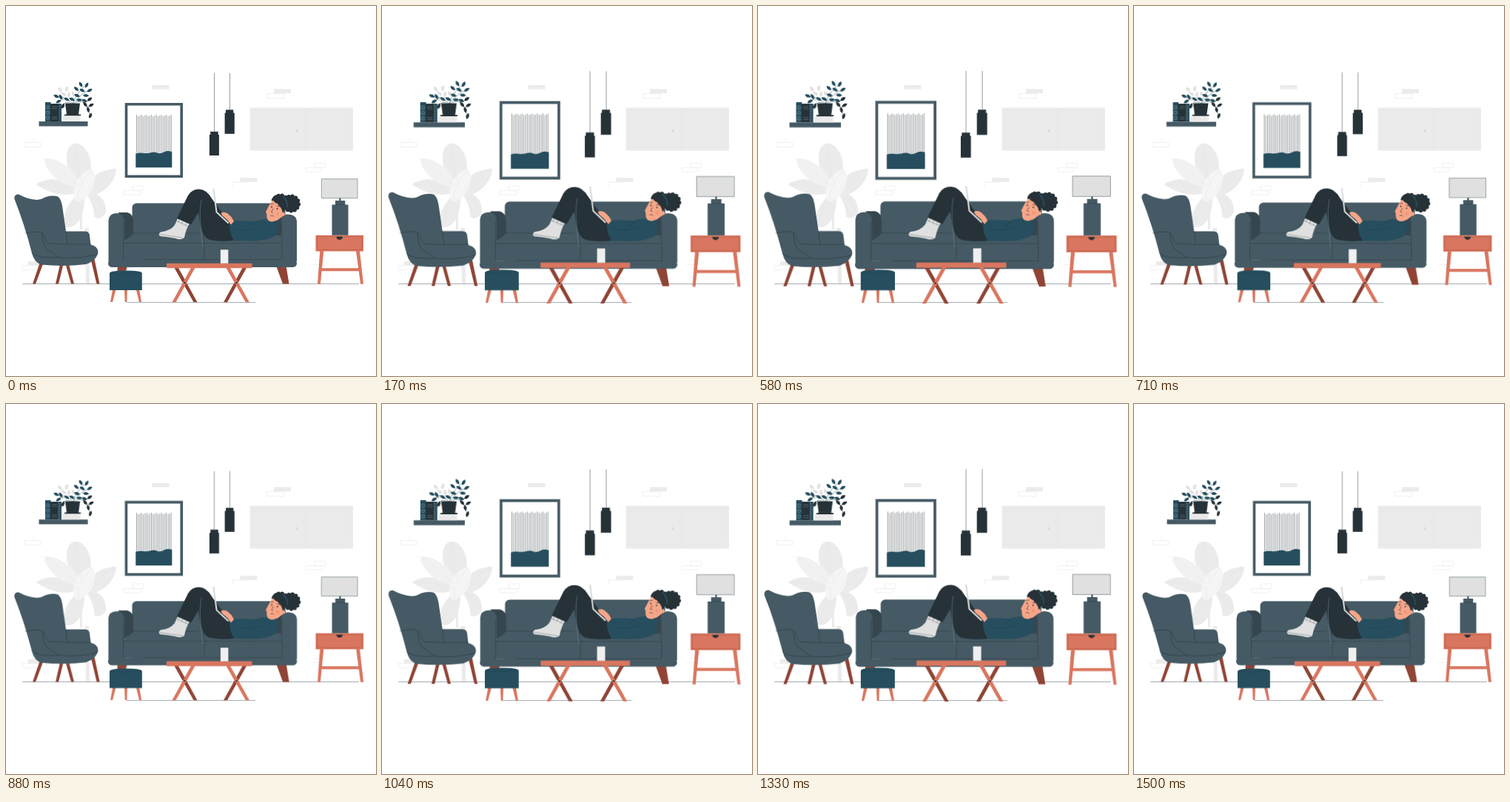
An HTML page for the animation above (1540 ms loop, 500 by 500 pixels).

```html
<!DOCTYPE html>
<html lang="en">
<head>
<meta charset="utf-8">
<title>Living room</title>
<style>
  html, body { margin: 0; width: 100%; height: 100%; overflow: hidden; background: #fff; }
  svg { display: block; width: 100vw; height: 100vh; }
  .beat { animation: beat 1540ms infinite cubic-bezier(.37, 0, .63, 1); }
  @keyframes beat {
    0%, 97.4%, 100% { transform: scale(1); }
    22.4% { transform: scale(1.097); }
    55.4% { transform: scale(1); }
    78.2% { transform: scale(1.081); }
  }
  #shelf { transform-origin: 81px 132.5px; }
  #frame { transform-origin: 200px 181.5px; }
  #pendants { transform-origin: 292px 146px; }
  #lamp { transform-origin: 451px 304px; }
  #sofa { transform-origin: 266px 311px; }
  #chair { transform-origin: 68.5px 314px; }
  #stool { transform-origin: 162px 379px; }
  #table { transform-origin: 274.5px 365px; }
  .slate { fill: #455a64; } .dark { fill: #263238; } .teal { fill: #264e5e; }
  .clay { fill: #d9765f; } .rust { fill: #8f4435; } .skin { fill: #f6a688; }
  .pale { fill: #e0e0e0; } .wall { fill: #ebebeb; }
  .line { fill: none; stroke: #263238; stroke-width: .6; stroke-linecap: round; stroke-linejoin: round; }
  .thin { fill: none; stroke: #ebebeb; stroke-width: .7; }
  .vein { fill: none; stroke: #e0e0e0; stroke-width: .5; }
</style>
</head>
<body>
<svg viewBox="0 0 500 500">
  <g id="bricks">
    <path class="wall" d="M197.500 107h23v5.500h-23zM362 112.300h23v5.700h-23zM316.500 232.300h23v5.500h-23zM30 345h18v5.500h-18z"/>
    <path class="thin" d="M352.500 118.500h23.500v6h-23.500zM306 238h22M306 238v6M171.500 243h13.500v6.500h-13.500zM158.500 249.500h24v5.500h-24zM25 184.500h22v6h-22zM37 184v-5M416.500 212.500h15v6h-15zM405.500 218.500h21v5.500h-21zM22 350.500h22v6h-22zM411 349.500h13v-6h-7"/>
  </g>

  <g id="cabinet">
    <path class="wall" d="M329.500 137.500H469v58H329.500z"/>
    <path class="vein" d="M335 141.500h67v49h-67zM406.500 141.500H464v49h-57.500zM404 138v57"/>
    <circle cx="393" cy="168.500" r="2" fill="#dcdcdc"/>
  </g>

  <g id="monstera">
    <path class="wall" d="M98 262Q100 285 100 302h3Q102 280 105 262zM106.500 300h5.500l1 75.500h-5z"/>
    <path class="wall" d="M100 247C79 226 75 187 95 185.500C114 188 121 222 109 244zM97 250C82 262 52 250 41 241C52 231 80 232 97 245zM109 250C113 230 128 221 149 219.500C149 236 133 255 111 257zM99 255C84 262 75 285 79 298C93 303 106 288 106 259z"/>
    <path fill="#f1f1f1" d="M97 247C78 243 51 225 52 206C72 205 92 220 99 240z"/>
    <path class="wall" d="M109 253C123 250 137 262 135 279C130 288 121 289 119 284C120 270 112 262 109 253z"/>
    <path fill="#f5f5f5" d="M95 265C85 250 97 224 116 220C127 231 116 260 97 265z"/>
    <path class="vein" opacity=".7" d="M94 190Q97 220 104 243M55 209Q76 222 97 243M45 241Q72 242 96 247M145 222Q122 232 110 251M82 295Q88 272 100 259M116 222Q99 238 96 263M133 278Q124 260 111 254"/>
  </g>

  <path d="M22 375.500H477M163 400.600H337" stroke="#455a64" stroke-width=".5"/>

  <g id="shelf" class="beat">
    <path class="slate" d="M44.500 156H110.500v6.500h-66z"/>
    <path class="teal" d="M53 130h7.500v26H53zM71 132h4v24h-4z"/>
    <path class="dark" d="M60 132h11v24H60z"/>
    <path d="M62 136h7M62 138.500h7M62 150h7M62 152.500h7" stroke="#78909c" stroke-width=".5"/>
    <g fill="none" stroke="#90a4ae" stroke-width=".6">
      <circle cx="56.500" cy="137" r="2"/><circle cx="56.500" cy="144" r="2"/><circle cx="56.500" cy="151" r="2"/>
      <path d="M73 134v20" stroke-dasharray="1.500 2"/>
    </g>
    <path class="wall" d="M76.500 148.500h24v7.500h-24z"/>
    <path class="vein" d="M77 152h23M82 149v7M95 149v7"/>
    <g id="leaves"></g>
    <path class="dark" d="M80 131.500h20l-2 15.500h-16zM79 146.500h22v1.700H79z"/>
  </g>

  <g id="frame" class="beat">
    <path d="M162.500 132.700h74.700v97.500h-74.700z" fill="#fff" stroke="#455a64" stroke-width="3.600"/>
    <path id="rain" fill="none" stroke="#263238" stroke-width=".45"/>
    <path class="teal" d="M175.300 199.500q5-1.500 10-.7t10-.6 9 .3 9-1.100 11-.3v21.200h-49z"/>
  </g>

  <g id="pendants" class="beat">
    <path class="line" stroke-width=".5" d="M281.500 91v79M302.500 91v50" opacity=".8"/>
    <path class="dark" d="M276.200 169.700h10.500v4.300h1.200v28h-13v-28h1.300zM297 140.300h10.300v4.200h1.500v28.300h-13.200v-28.300h1.400z"/>
  </g>

  <g id="lamp" class="beat">
    <path class="clay" d="M424.300 331h5l-4.400 44.800h-3.900zM473 331h5l5 44.800h-3.900zM426 354.300h51v4h-51zM418.500 309.700h64.500v21.700h-64.500z"/>
    <path fill="none" stroke="#a9543f" stroke-width=".5" d="M420.500 311.700h60.500v17.700h-60.500z"/>
    <path class="dark" d="M446.500 311.700a4.200 4 0 0 0 8.400 0zM450.500 259h1.800v5h-1.800z"/>
    <path class="slate" d="M445 263h13.300v5.500h4.200v41.200h-22v-41.200h4.500z"/>
    <path class="line" d="M445.500 268.500h12.500" opacity=".6"/>
    <path class="pale" d="M426.300 233.700H475v26h-48.700z" stroke="#455a64" stroke-width=".5"/>
  </g>

  <g id="sofa" class="beat">
    <path class="rust" d="M151 351h13l-6.500 24.500h-8.500zM365 351H378.500l4 24.500H374z"/>
    <rect class="slate" x="170.500" y="266.400" width="207" height="80" rx="6"/>
    <path class="line" d="M266.500 268V306" opacity=".3"/>
    <path fill="#36464e" d="M152 279H164Q172 281 172 291V308L158 320z"/>
    <path class="slate" d="M138.500 345V290Q139 280.500 149 280Q160 280.500 160 292V345z"/>
    <path fill="#36464e" d="M360 292Q361 281 372 280V310H360z"/>
    <path class="slate" d="M372 345V292Q372 282.500 380 281.500Q393 281.500 393 292V345z"/>
    <path class="slate" d="M158 320.500L172 307H362L373 320.500V343H158z"/>
    <rect class="slate" x="138" y="342.700" width="255" height="10.300" rx="5"/>
    <path class="line" d="M159 320.500L172 307H260M158.500 320.500H373V342M158.500 292V342M266.500 307L268 320.500V342M186 342.700H373M372.500 292V320" opacity=".65"/>

    <g id="person">
      <path class="pale" d="M232 287L248 294Q243 302 241 313Q236 317 229 314Q218 312 208 311Q205 308 209 305.500Q222 304 228 296z"/>
      <path d="M231 291L246 297.500M208 308.500Q222 311 238 313M234 288l-1 4M239 290l-1 4M244 293l-1 3" class="line" opacity=".5"/>
      <path class="dark" d="M231 287L246 256Q251 247.500 261 247.500Q271 248 278 260L303 295L308 317Q287 319 274 315.500Q266 312 262.500 296L260 279L250 295.500z"/>
      <path d="M264 262Q261 275 263 296Q265 320 266 325" fill="none" stroke="#78909c" stroke-width=".5"/>
      <path class="teal" d="M302 296Q305 291 309 290.500Q322 290 338 291Q349 286 365 289.500Q371 301 363 311Q352 317 332 317.500L308 317Q302 307 302 296z"/>
      <path class="line" d="M310 301Q324 306 344 300M340 291Q334 294 330 300" opacity=".5"/>
      <path class="skin" d="M290.500 280Q293 277.500 299 280L304.500 285L308 291L304 295.500L299.500 289.500Q295 285.500 292.500 283.500zM353 284L366 290L374 284L372 276z"/>
      <path d="M280.500 247.500L284.500 278.500L300 293" fill="none" stroke="#d8dadb" stroke-width="2" stroke-linejoin="round" stroke-linecap="round"/>
      <g class="dark">
        <circle cx="385" cy="267" r="11"/>
        <circle cx="371" cy="265" r="10"/>
        <path id="curls" fill="none" stroke="#263238" stroke-linecap="round" stroke-width="5.500"/>
      </g>
      <path class="skin" d="M360.500 262Q355.500 268 353 274.500L351 278L352.300 281Q351.800 286 354 289.500Q358 293 365 290Q373 286 376 278Q372 272 369 266Q365 261 360.500 262z"/>
      <path class="dark" d="M358.500 263Q361 254 369 255L377 263Q380 274 374 280Q373 274 370 271Q368 270 367 267Q363 266 362 263.500Q360 262.500 358.500 263z"/>
      <path d="M374 257Q381 263 380 272" fill="none" stroke="#264e5e" stroke-width="2"/>
      <circle class="skin" cx="374.500" cy="281.500" r="2.400"/>
      <circle class="dark" cx="359" cy="271.500" r=".9"/><circle class="dark" cx="366.500" cy="274" r=".9"/>
      <path class="line" d="M358 268l3-.6M366 270l3 1.500M361 274l-2.500 4.500 2 .8M357.500 283.500q2-1.500 4 .5"/>
      <circle cx="367" cy="281" r="2.200" fill="#e7795f" opacity=".35"/>
    </g>
  </g>

  <g id="chair" class="beat">
    <path class="rust" d="M46 346h5l-11 29.500h-4zM73.500 347h4.500l-7 28.500h-4zM80 347h4.500l7.500 28.500h-4zM114.500 342h5l7 33.500h-4z"/>
    <path class="slate" d="M11.500 261Q10.500 254.500 17 254.500Q30 261.500 42 262Q48 261.500 54 258Q63 255.300 70 257.500Q74 260 76 270L81 304.500H106.500Q112.500 304.500 113 310L114.500 322.500Q124.500 325 124.500 332.500Q122.500 344 108 349Q79 352.500 47 349.500Q38 346 35 334Q25 295 11.500 261z"/>
    <path class="line" d="M26 307Q40 304 49 306Q52 309 54 317L58 321L82 322H114.500M81 305L83 322M49 307Q49 319 54 327L71 339.500Q97 342.500 124 335.500M35 334Q43 341.500 71 339.500" opacity=".75"/>
  </g>

  <g id="stool" class="beat">
    <path class="clay" d="M144.300 382h4.500l-4.800 18h-3zM160 382h4l-.7 18h-2.600zM175.500 382h4.500l3 18h-3z"/>
    <path class="teal" d="M140 361Q141 357.500 162 357.500Q183 357.500 183.800 361V384H140z"/>
    <path class="line" d="M140.500 361Q161 363.500 183 361" opacity=".4"/>
  </g>

  <g id="table" class="beat">
    <path class="rust" d="M227 353h5.500l26 47.300h-5zM320 353h5.500l-26.500 47.300h-5z"/>
    <path class="clay" d="M250.500 353h5.500l-26.500 47.300h-5zM297 353h5.500l26.300 47.300h-5z"/>
    <circle class="dark" cx="241.500" cy="374" r="1.200"/><circle class="dark" cx="311.500" cy="374" r="1.200"/>
    <rect class="clay" x="217" y="347.700" width="115.500" height="6.500" rx="1"/>
    <path d="M290 329.500h10.200v18.200H290z" fill="#f0f0f0" stroke="#d8d8d8" stroke-width=".4"/>
  </g>
</svg>
<script>
  const byId = id => document.getElementById(id);

  byId('rain').setAttribute('d', Array.from({ length: 22 }, (_, i) =>
    `M${(176.500 + i * 2.230).toFixed(1)} ${147 + i * 5 % 3}V199`).join(''));

  // Round dots along the outline of the hair
  const curl = (cx, cy, r, from, to, count) => Array.from({ length: count }, (_, i) => {
    const a = (from + (to - from) * i / (count - 1)) * Math.PI / 180;
    return `M${(cx + r * Math.cos(a)).toFixed(1)} ${(cy + r * Math.sin(a)).toFixed(1)}h.01`;
  }).join('');
  byId('curls').setAttribute('d', curl(385.500, 267, 9.800, -110, 120, 9) + curl(371, 265, 9, -170, -45, 5));

  const leaf = (x, y, turn, fill) =>
    `<path d="M-4.100 0Q0 -4 4.100 0Q0 4 -4.100 0z" fill="${fill}" transform="translate(${x} ${y}) rotate(${turn})"/>`;
  const stem = (d, color) => `<path d="${d}" fill="none" stroke="${color}" stroke-width=".5"/>`;
  const back = [[73, 113, 50], [82, 112, 110], [78, 119, 30], [85, 120, 100], [91, 119, 60], [76, 126, 20]];
  const front = [
    [101, 106, 60], [109, 107, 120], [113, 114, 150], [95, 112, 40], [103, 114, 30], [96, 121, 20],
    [108, 121, 5], [89, 126, 25], [99, 127, 0], [106, 128, 20], [68, 122, 25], [74, 123, 60],
    [82, 126, 30], [71, 129, 150], [77, 135, 110], [113, 126, 145], [107, 133, 50], [115, 134, 150],
    [111, 140, 80], [114, 148, 110]
  ];
  byId('leaves').innerHTML =
    stem('M89 132Q87 118 80 110M88 132Q80 122 73 116', '#dcdcdc') +
    back.map(p => leaf(...p, '#e0e0e0')).join('') +
    stem('M90 132Q96 116 108 107M90 132Q104 116 113 114M90 132Q81 123 68 122M91 132Q107 122 113 146M88 132Q80 127 77 135', '#264e5e') +
    front.map((p, i) => leaf(...p, i > 13 ? '#263238' : '#264e5e')).join('');
</script>
</body>
</html>
```
